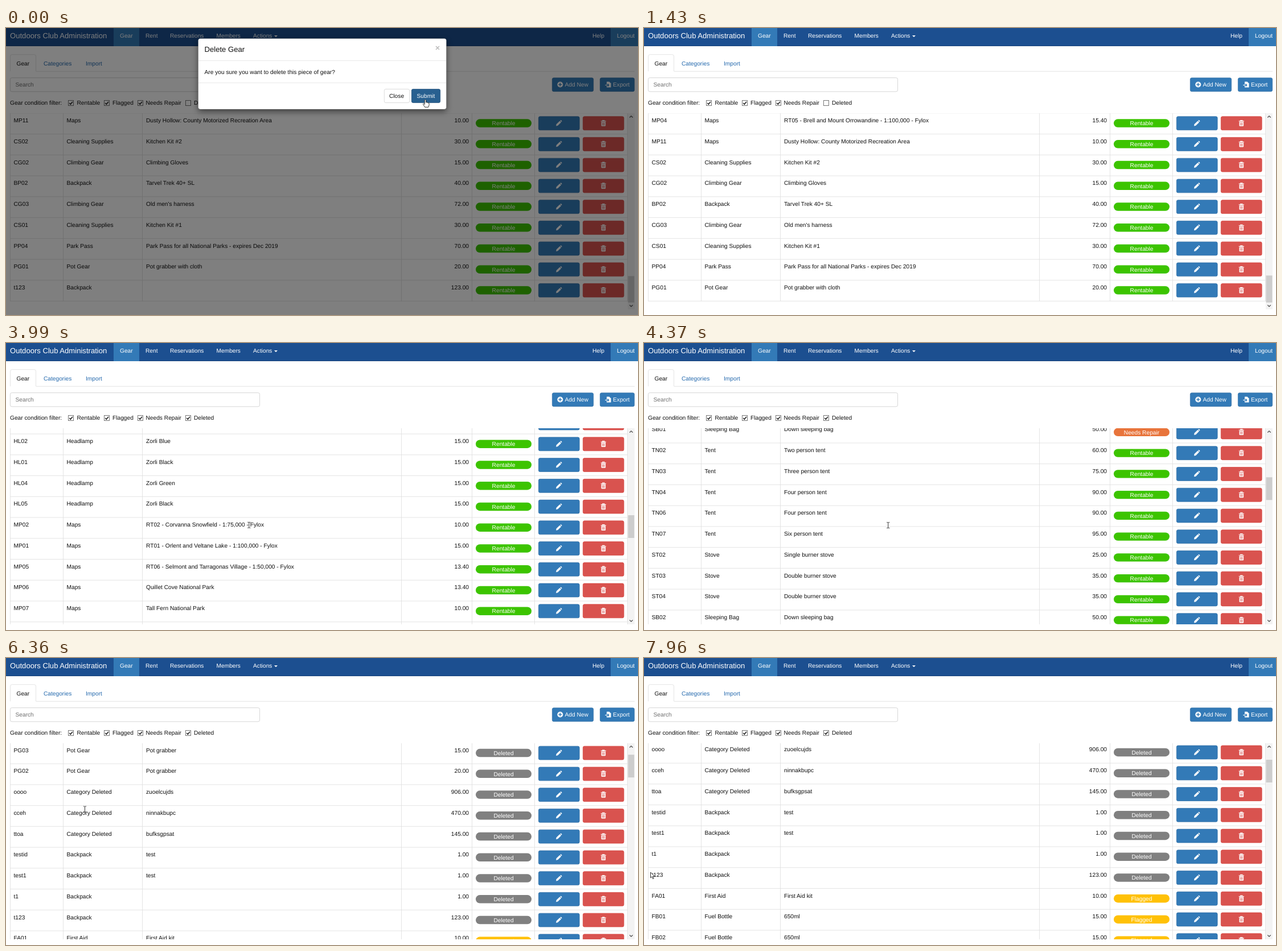
Animation of 1110x505 px, one loop 8000 ms. Source, as an HTML page:

```html
<!DOCTYPE html>
<html lang="en">
<head>
<meta charset="utf-8">
<title>Gear administration</title>
<style>
  html, body { margin: 0; width: 100%; height: 100%; overflow: hidden; background: #fff; }
  svg { display: block; width: 1110px; height: 505px; }
  text { font: 10.2px "Liberation Sans", Arial, sans-serif; fill: #111; text-rendering: geometricPrecision; white-space: pre; }
  .w { fill: #fff; }
  .link { fill: #2469ad; }
  .b { font-weight: bold; }
  .big { font-size: 13.1px; }
  .mid { text-anchor: middle; }
  .end { text-anchor: end; }
  .line { stroke: #ddd; stroke-width: .8; fill: none; }
</style>
</head>
<body>
<svg viewBox="0 0 1110 505">
  <defs>
    <clipPath id="view"><rect x="7" y="150" width="1085" height="345"/></clipPath>
    <filter id="blur" x="-20%" y="-40%" width="140%" height="180%"><feGaussianBlur stdDeviation="5.5"/></filter>
    <g id="pencil" fill="#fff">
      <path d="M-5 5 L-4.3 1.7 L1.5 -4 L4 -1.5 L-1.8 4.3 Z"/>
      <path d="M2.2 -4.6 L3.1 -5.3 Q3.6 -5.6 4.1 -5.2 L5.3 -4 Q5.6 -3.5 5.2 -3 L4.6 -2.2 Z"/>
    </g>
    <g id="trash">
      <path d="M-4.6 -3.6 H4.6 M-1.6 -3.8 V-5 H1.6 V-3.8" stroke="#fff" stroke-width="1.2" fill="none"/>
      <path d="M-3.8 -2.4 H3.8 V4 Q3.8 5.2 2.6 5.2 H-2.6 Q-3.8 5.2 -3.8 4 Z" fill="#fff"/>
      <path d="M-1.7 -1 V3.8 M0 -1 V3.8 M1.7 -1 V3.8" stroke="#d9534f" stroke-width=".8"/>
    </g>
    <path id="arrow" d="M0 0 V9.8 L2.3 7.7 L4 11.6 L5.6 10.9 L4 7.1 H7 Z" fill="#fff" stroke="#222" stroke-width=".9"/>
    <path id="beam" d="M-2.5 -5 H-.8 L0 -4.4 L.8 -5 H2.5 M0 -4.4 V4.4 M-2.5 5 H-.8 L0 4.4 L.8 5 H2.5" fill="none" stroke="#333"/>
    <path id="hand" d="M-1.2 .8 Q0 -.8 1.2 .8 V5 Q2.4 4 3.2 5.3 Q4.5 4.6 5 5.9 Q6.6 5.4 6.6 7.2 V9.6 L5.3 13.3 H-.8 L-3.8 8.6 Q-4.3 7.2 -3 7 L-1.2 8.6 Z" fill="#fff" stroke="#222" stroke-width=".9"/>
  </defs>
  <g id="page"></g>
  <g id="table" clip-path="url(#view)"></g>
  <g id="bar"></g>
  <g id="dialog"></g>
  <use id="cursor"/>
</svg>
<script>
const LOOP = 8000, PITCH = 36.75, HEAD = 28, TOP = 150, BOTTOM = 495, LAST_LINE = 480.6;
const $ = id => document.getElementById(id);
const esc = s => s.replace(/&/g, '&amp;');
const text = (x, y, s, cls = '') => `<text x="${x}" y="${y}" class="${cls}">${esc(s)}</text>`;
const rect = (x, y, w, h, fill, more = '') => `<rect x="${x}" y="${y}" width="${w}" height="${h}" fill="${fill}" ${more}/>`;
const path = (d, more) => `<path d="${d}" ${more}/>`;
const button = (x, y, w, fill, edge) =>
  rect(x + .35, y + .35, w - .7, 23.9, fill, `rx="2.6" stroke="${edge}" stroke-width=".7"`);
const caret = (x, y, up, fill = '#222') =>
  path(up ? `M${x} ${y + 3} h6 l-3 -3 z` : `M${x} ${y} h6 l-3 3 z`, `fill="${fill}"`);

const COLORS = { Rentable: '#3cc400', Flagged: '#ffc107', Deleted: '#808080', 'Needs Repair': '#e8743b' };
const KINDS = {
  PG: 'Pot Gear', FA: 'First Aid', FB: 'Fuel Bottle', HL: 'Headlamp', MP: 'Maps', CP: 'Crashpad', TN: 'Tent',
  CS: 'Cleaning Supplies', CG: 'Climbing Gear', BP: 'Backpack', PP: 'Park Pass', SB: 'Sleeping Bag', ST: 'Stove'
};

// One item per line: id | description | fee | category when the id prefix does not tell it
const parse = (lines, state) => lines.trim().split('\n').map(line => {
  const [id, note, fee, kind] = line.trim().split('|');
  return { id, note, fee, kind: kind || KINDS[id.slice(0, 2)], state };
});

const deleted = parse(`
  lkvu|puhxlgowwe|701.00|Category Deleted
  PG03|Pot grabber|15.00
  PG02|Pot grabber|20.00
  oooo|zuoelcujds|906.00|Category Deleted
  cceh|ninnakbupc|470.00|Category Deleted
  ttoa|bufksgpsat|145.00|Category Deleted
  testid|test|1.00|Backpack
  test1|test|1.00|Backpack
  t1||1.00|Backpack
  t123||123.00|Backpack`, 'Deleted');

const flagged = parse(`
  FA01|First Aid kit|10.00
  FB01|650ml|15.00
  FB02|650ml|15.00
  FB03|1000ml|15.00`, 'Flagged');

const repair = parse(`
  TN01|Two person tent|60.00
  ST01|Single burner stove|25.00
  SB01|Down sleeping bag|50.00`, 'Needs Repair');

const rentable = parse(`
  TN02|Two person tent|60.00
  TN03|Three person tent|75.00
  TN04|Four person tent|90.00
  TN06|Four person tent|90.00
  TN07|Six person tent|95.00
  ST02|Single burner stove|25.00
  ST03|Double burner stove|35.00
  ST04|Double burner stove|35.00
  SB02|Down sleeping bag|50.00
  SB03|Synthetic sleeping bag|40.00
  BP01|Day pack 30L|30.00
  BP03|Travel pack 60L|45.00
  CP01|Folding crashpad|65.00
  CG01|Climbing harness|20.00
  CG04|Climbing helmet|20.00
  HL02|Zorli Blue|15.00
  HL01|Zorli Black|15.00
  HL04|Zorli Green|15.00
  HL05|Zorli Black|15.00
  MP02|RT02 - Corvanna Snowfield - 1:75,000 - Fylox|10.00
  MP01|RT01 - Orlent and Veltane Lake - 1:100,000 - Fylox|15.00
  MP05|RT06 - Selmont and Tarragonas Village - 1:50,000 - Fylox|13.40
  MP06|Quillet Cove National Park|13.40
  MP07|Tall Fern National Park|10.00
  MP09|Canyon trails|10.00
  MP10|Desert roads|10.00
  MP12|Lakes and rivers|10.00
  MP14|Coastal trails|10.00
  MP15|Valley trails - Paper|10.00
  MP16|Ridge trails - Vinyl|10.00
  MP19|Forest roads - Paper|10.00
  MP20|Winter routes - Vinyl|10.00
  SB04|Summer sleeping bag|30.00
  TN05|Tarp shelter|20.00
  PP01|Day pass|10.00
  PP02|Weekend pass|20.00
  CP02|VOK crashpad|65.00
  MP03|RT03 - Elk Pond and Tarrawonkamin Junction - 1:70,000 - Paper|10.50
  HL03|Zorli Red|15.00
  MP08|Amber Gorge National Park|10.00
  MP13|Arizona & New Mexico|10.00
  MP18|47 K/10 Plovermere - 1:50,000 -Paper|10.00
  MP21|46 D/2 Torle River - 1:50,000 - Vinyl|10.00
  MP17|RT09 - Fernhill & Waterslip Creek - 1:50,000 - Fylox|10.00
  FA02|First Aid kit|10.00
  FB04|650ml|15.00
  MP04|RT05 - Brell and Mount Orrowandine - 1:100,000 - Fylox|15.40
  MP11|Dusty Hollow: County Motorized Recreation Area|10.00
  CS02|Kitchen Kit #2|30.00
  CG02|Climbing Gloves|15.00
  BP02|Tarvel Trek 40+ SL|40.00
  CG03|Old men's harness|72.00
  CS01|Kitchen Kit #1|30.00
  PP04|Park Pass for all National Parks - expires Dec 2019|70.00
  PG01|Pot grabber with cloth|20.00`, 'Rentable');

const live = [...flagged, ...repair, ...rentable];
const before = [...live, { ...deleted[9], state: 'Rentable' }];
const all = [...deleted, ...live];

// Moments at which the picture may change: [first, last], 120 ms apart
const STEPS = [[0, 240], [380, 380], [670, 790], [950, 1430], [2550, 3270], [3390, 4110], [4250, 4370], [4510, 4510],
  [4650, 4650], [4790, 4790], [5040, 5760], [5880, 6480], [6620, 6860], [7000, 7720], [7840, 7960]];
const snap = t => {
  const [a, b] = STEPS.filter(s => s[0] <= t).pop();
  return a + Math.floor((Math.min(t, b) - a) / 120) * 120;
};

// Linear path through [time, value, ...] points
const along = (keys, t, i = 1) => {
  const n = keys.findIndex(k => k[0] > t);
  if (n < 0) return keys[keys.length - 1][i];
  if (n === 0) return keys[0][i];
  const p = keys[n - 1], q = keys[n];
  return p[i] + (q[i] - p[i]) * (t - p[0]) / (q[0] - p[0]);
};

const SCROLL = [[3510, 1975.2], [3990, 1194], [4790, 0], [5760, 0], [6360, 65.4], [6860, 140]];
const POINTER = [[0, 736.5, 126], [380, 735, 126], [550, 735, 126], [670, 724, 146], [790, 735, 165],
  [1430, 1083, 510], [2430, 1010, 500], [2550, 975, 464], [2910, 600, 262], [3270, 317, 128], [3390, 345, 190],
  [3510, 417, 307], [3630, 425, 320], [4790, 431, 321], [5040, 415, 309], [5160, 379, 290], [5760, 176, 268],
  [6000, 139, 266], [6360, 138.5, 266], [6860, 119, 273], [7720, 18, 352], [7840, 15, 365], [7960, 11.5, 377]];
const shape = t => t < 380 ? 'hand' : t >= 3630 && t < 5160 || t >= 5880 && t < 7000 ? 'beam' : 'arrow';

function page(checked) {
  const box = (x, on) => rect(x + .5, 127.5, 9, 9, '#fff', 'stroke="#777"') +
    (on ? path(`M${x + 2.3} 132 l2 2.3 l3.6 -4.6`, 'fill="none" stroke="#222" stroke-width="1.5"') : '');
  const filters = [[109, 'Rentable', 124.5], [172, 'Flagged', 187], [231, 'Needs Repair', 245.5], [315, 'Deleted', 330]];
  const nav = [[200, 'Gear'], [245, 'Rent'], [288, 'Reservations'], [369.5, 'Members'], [434, 'Actions'], [1030, 'Help'], [1073, 'Logout']];
  return rect(0, 0, 1110, 505, '#fff') + rect(0, 0, 1110, 32, '#1c4f90') + rect(0, 31, 1110, 1, '#18437c') +
    rect(189, 0, 45, 32, '#337ab7') + rect(1062, 0, 48, 32, '#337ab7') +
    text(7, 18, 'Outdoors Club Administration', 'w big') + nav.map(([x, s]) => text(x, 17, s, 'w')).join('') +
    caret(471, 13, false, '#fff') +
    path('M53 76.3 H1104 M7.5 76.3 V50 Q7.5 46.7 10.5 46.7 H49.5 Q52.5 46.7 52.5 50 V76.3', 'class="line"') +
    text(18.5, 65.5, 'Gear') + text(66, 65.5, 'Categories', 'link') + text(140, 65.5, 'Import', 'link') +
    rect(7.4, 87.6, 438.2, 24.3, '#fff', 'rx="2.8" stroke="#ccc" stroke-width=".8"') +
    '<g opacity=".6">' + text(16.5, 103, 'Search') + '</g>' +
    button(959, 87.4, 73, '#337ab7', '#2e6da4') + button(1043, 87.4, 61, '#337ab7', '#2e6da4') +
    '<circle cx="973.3" cy="99.5" r="5" fill="#fff"/>' +
    path('M970.3 99.5 h6 M973.3 96.5 v6', 'stroke="#337ab7" stroke-width="1.5"') + text(981.5, 103, 'Add New', 'w') +
    path('M1055 94.5 h4.5 l3 3 v7 h-7.5 z', 'fill="#fff"') +
    path('M1052.5 100.5 h6 m-2 -2.2 l2.2 2.2 l-2.2 2.2', 'stroke="#337ab7" stroke-width="1.3" fill="none"') +
    path('M1052.3 100.5 h2.7', 'stroke="#fff" stroke-width="1.3"') + text(1066, 103, 'Export', 'w') +
    text(7, 134.5, 'Gear condition filter:') +
    filters.map(([x, s, tx], i) => box(x, i < 3 || checked) + text(tx, 134.5, s)).join('');
}

function row(item, y) {
  return text(13.5, y + 16.2, item.id) + text(106.5, y + 16.2, item.kind) + text(246, y + 16.2, item.note) +
    text(813, y + 16.2, item.fee, 'end') +
    rect(825, y + 10.5, 98, 14.4, COLORS[item.state], 'rx="7.2"') + text(874, y + 21.4, item.state, 'w mid') +
    button(935, y + 5.5, 72.5, '#337ab7', '#2e6da4') + button(1013, y + 5.5, 72.5, '#d9534f', '#d43f3a') +
    `<use href="#pencil" x="971" y="${y + 17.7}"/><use href="#trash" x="1049.3" y="${y + 17.7}"/>` +
    path(`M7 ${y + PITCH} H1092`, 'class="line"');
}

function header(y) {
  const cols = [[13.5, 'Gear ID', 51.5], [106.5, 'Category', 152], [246, 'Description', 303.5],
    [700.5, 'Deposit Fee', 759.5], [825, 'Condition', 0], [935, 'Actions', 0]];
  return cols.map(([x, s, c]) => text(x, y + 17, s, 'b') +
    (c ? caret(c, y + 12.5, false) + caret(c + 7, y + 12, true) : '')).join('') + caret(874, y + 12, true) +
    path(`M7 ${y + .5} H1092`, 'class="line"') + rect(7, y + HEAD - 1, 1085, 1.3, '#ddd');
}

function table(items, scroll) {
  const start = TOP + HEAD - scroll, end = Math.min(BOTTOM, start + items.length * PITCH);
  let out = scroll < HEAD ? header(TOP - scroll) : '';
  items.forEach((item, i) => {
    const y = start + i * PITCH;
    if (y > TOP - PITCH - 1 && y < BOTTOM) out += row(item, y);
  });
  return out + path([7.5, 100.5, 239.5, 694.5, 818.5, 928.5, 1091.5].map(x => `M${x} ${TOP} V${end}`).join(''), 'class="line"');
}

function scrollbar(y, h) {
  return rect(1092, 150, 12, 345, '#f3f3f3') + rect(1092.5, y, 11, h, '#cdcdcd') +
    path('M1095.3 157.5 l2.7 -2.7 l2.7 2.7 M1095.3 487.5 l2.7 2.7 l2.7 -2.7', 'fill="none" stroke="#505050" stroke-width="1.3"');
}

function dialog(fade) {
  if (!fade) return '';
  return rect(0, 0, 1110, 505, '#000', `opacity="${.25 + .25 * fade}"`) +
    `<g opacity="${fade}" transform="translate(0 ${(fade - 1) * 18})">` +
    rect(337.5, 22, 436, 125, '#000', 'rx="4" opacity=".5" filter="url(#blur)"') +
    rect(337.5, 18.5, 436, 124.5, '#fff', 'rx="4" stroke="#000" stroke-opacity=".2"') +
    text(348.5, 42, 'Delete Gear', 'big') +
    path('M755 32 l6 6 m0 -6 l-6 6', 'stroke="#bbb" stroke-width="1.6"') +
    path('M338 57.5 H773 M338 96.5 H773', 'stroke="#e8e8e8"') +
    text(348.5, 81, 'Are you sure you want to delete this piece of gear?') +
    button(664, 107.2, 45, '#fff', '#ccc') + text(673, 123, 'Close') +
    button(712, 107.2, 51, '#286090', '#204d74') + text(721.5, 123, 'Submit', 'w') + '</g>';
}

let shown = -1;
function draw(t) {
  const now = snap(t);
  if (now === shown) return;
  shown = now;
  const checked = now >= 3390, old = now < 240;
  const items = old ? before : checked ? all : live;
  const scroll = checked ? along(SCROLL, now) : HEAD + items.length * PITCH + TOP - LAST_LINE;
  $('page').innerHTML = page(checked);
  $('table').innerHTML = table(items, scroll);
  $('bar').innerHTML = checked ? scrollbar(162.5 + scroll * .1177, 40) : old ? scrollbar(436.5, 46.5) : scrollbar(435.5, 47.5);
  $('dialog').innerHTML = dialog(now < 120 ? 1 : old ? .5 : 0);
  const cursor = $('cursor');
  cursor.setAttribute('href', '#' + shape(now));
  cursor.setAttribute('x', along(POINTER, now));
  cursor.setAttribute('y', along(POINTER, now, 2));
  cursor.setAttribute('visibility', now >= 1430 && now < 2550 ? 'hidden' : 'visible');
}

const begin = performance.now();
function tick() {
  draw((performance.now() - begin) % LOOP);
  requestAnimationFrame(tick);
}
tick();
</script>
</body>
</html>
```
